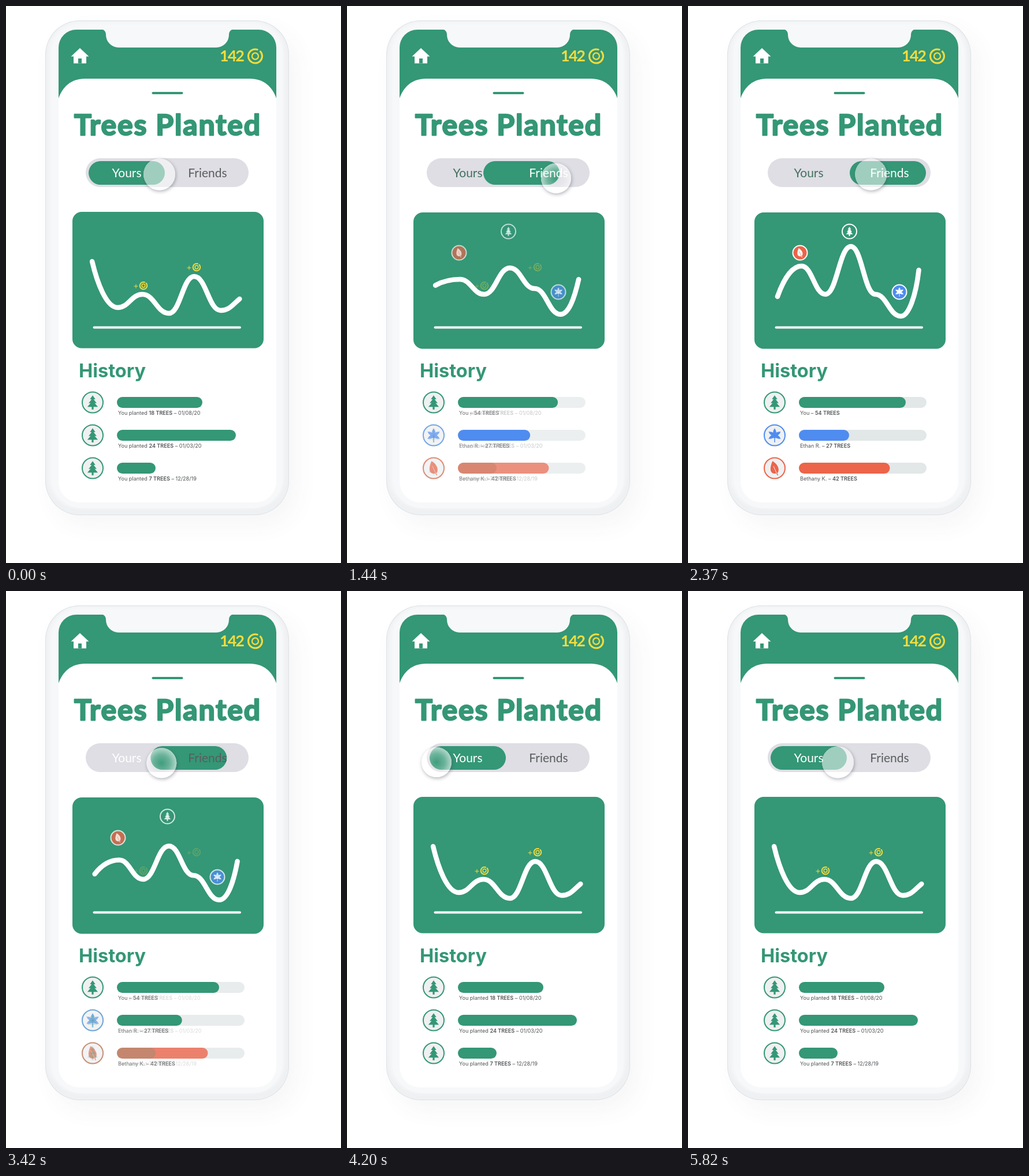
Animation, 580 px wide and 966 px high, one loop 6750 ms. Source, as an HTML page with a canvas:

```html
<!DOCTYPE html>
<html lang="en">
<head>
<meta charset="utf-8">
<title>Trees Planted</title>
<style>
  html, body { margin: 0; width: 100%; height: 100%; overflow: hidden; background: #fff; }
  canvas { display: block; width: 580px; height: 966px; }
</style>
</head>
<body>
<canvas id="stage" width="580" height="966"></canvas>
<script>
const ctx = document.getElementById('stage').getContext('2d');
const LOOP = 6750, STEP = 30, LAST_MOVE = 5820;
const GREEN = '#349776', BLUE = '#4f8cf0', RED = '#ec6449', GOLD = '#f5dc3c', BEZEL = '#f7f8f9';

// The drag to "Friends", the drag back, and the knob's free glides between them.
const DRAG = 965, GLIDE = 625, OUT = 840, BACK = 3130;
const PILL_TRAVEL = 137, KNOB_GLIDE = 114, OVERSHOOT = 7;

// Turning points of the chart: x, then y for each tab.
const CURVE = [[152, 443, 504], [195, 523, 451], [237, 500, 500], [282, 533, 417],
  [325, 469, 500], [370, 528, 538], [402, 508, 458]];

const ROWS = [
  { icon: 'tree', color: GREEN, from: 148, to: 185, count: 18, date: '01/08/20', who: 'You', total: 54 },
  { icon: 'maple', color: BLUE, from: 206, to: 87, count: 24, date: '01/03/20', who: 'Ethan R.', total: 27 },
  { icon: 'leaf', color: RED, from: 67, to: 157.5, count: 7, date: '12/28/19', who: 'Bethany K.', total: 42 }
];

const lerp = (a, b, k) => a + (b - a) * k;

function ramp(t, start, duration) {
  const k = Math.min(1, Math.max(0, (t - start) / duration));
  return k * k * (3 - 2 * k);
}

function pose(t) {
  const shift = ramp(t, OUT, DRAG) - ramp(t, BACK, DRAG);
  const over = ramp(t, OUT + DRAG, 95) - ramp(t, BACK + DRAG, 95);
  const glide = ramp(t, 1901, GLIDE) - ramp(t, 5306, GLIDE) + 1 - ramp(t, -560, GLIDE);
  const low = ramp(t, 800, 400) - ramp(t, 1901, 500) + ramp(t, 2980, 300);
  return {
    shift,
    returning: t >= BACK,
    active: ramp(t, OUT, 120) - ramp(t, BACK, 120),
    press: ramp(t, 700, 150) - ramp(t, 1850, 150) + ramp(t, 2980, 150) - ramp(t, 4200, 200),
    x: 269 + PILL_TRAVEL * shift + OVERSHOOT * over - KNOB_GLIDE * glide,
    y: 292 + 5 * low + 8 * shift * (1 - shift)
  };
}

function mix(a, b, k) {
  const part = (c, i) => parseInt(c.slice(i, i + 2), 16);
  return `rgb(${[1, 3, 5].map(i => Math.round(lerp(part(a, i), part(b, i), k)))})`;
}

function withAlpha(alpha, draw) {
  ctx.save();
  ctx.globalAlpha *= alpha;
  draw();
  ctx.restore();
}

// The incoming state always lies on top of the outgoing one.
function crossfade({ shift, returning }, yours, friends) {
  const layers = [() => withAlpha(1 - shift, yours), () => withAlpha(shift, friends)];
  if (returning) layers.reverse();
  layers.forEach(draw => draw());
}

function roundBox(x, y, w, h, r, fill) {
  ctx.beginPath();
  ctx.roundRect(x, y, w, h, r);
  if (fill) { ctx.fillStyle = fill; ctx.fill(); }
}

function disc(x, y, r, fill) {
  ctx.beginPath();
  ctx.arc(x, y, r, 0, Math.PI * 2);
  ctx.fillStyle = fill;
  ctx.fill();
}

function ring(x, y, r, width, color, start = 0, end = Math.PI * 2) {
  ctx.beginPath();
  ctx.arc(x, y, r, start, end);
  ctx.lineWidth = width;
  ctx.strokeStyle = color;
  ctx.stroke();
}

function line(x1, y1, x2, y2, width, color, cap = 'round') {
  ctx.beginPath();
  ctx.moveTo(x1, y1);
  ctx.lineTo(x2, y2);
  ctx.lineWidth = width;
  ctx.lineCap = cap;
  ctx.strokeStyle = color;
  ctx.stroke();
}

function triangle(x, top, halfWidth, height) {
  ctx.beginPath();
  ctx.moveTo(x, top);
  ctx.lineTo(x + halfWidth, top + height);
  ctx.lineTo(x - halfWidth, top + height);
  ctx.fill();
}

function text(str, x, y, font, color, align = 'left', spacing = 0) {
  ctx.font = font;
  ctx.textAlign = align;
  ctx.letterSpacing = spacing + 'px';
  ctx.fillStyle = color;
  ctx.fillText(str, x, y);
}

const SYMBOLS = {
  tree() {
    for (let tier = 0; tier < 3; tier++) triangle(0, -1 + tier * .38, .38 + tier * .18, .56 + tier * .16);
    ctx.fillRect(-.13, .5, .26, .5);
  },
  maple(color) {
    ctx.beginPath();
    for (let i = -10; i <= 10; i++) {
      const reach = i % 4 === 0 ? 1 : i % 2 ? .7 : .45;
      const angle = i * Math.PI / 12;
      ctx.lineTo(Math.sin(angle) * reach, -Math.cos(angle) * reach);
    }
    ctx.fill();
    line(0, 0, 0, 1, .12, color, 'butt');
  },
  leaf(color, back) {
    ctx.beginPath();
    ctx.moveTo(-.3, -1);
    ctx.bezierCurveTo(.3, -.65, .85, .1, .38, .72);
    ctx.bezierCurveTo(-.75, 1, -.75, 0, -.3, -1);
    ctx.fill();
    line(-.15, -.25, .27, .7, .08, back);
    line(.3, .72, .45, 1, .12, color, 'butt');
  }
};

function symbol(kind, x, y, size, color, back) {
  ctx.save();
  ctx.translate(x, y);
  ctx.scale(size, size);
  ctx.fillStyle = color;
  SYMBOLS[kind](color, back);
  ctx.restore();
}

function coin(x, y, r, width) {
  ctx.lineCap = 'round';
  ring(x, y, r, width, GOLD, -.75, Math.PI * 2 - 1.25);
  ring(x, y, r * .46, width * .75, GOLD);
}

function drawPhone() {
  const body = fill => roundBox(68, 25, 422, 858, 60, fill);
  ctx.save();
  ctx.shadowColor = 'rgba(70,85,100,.05)';
  ctx.shadowBlur = 40;
  ctx.shadowOffsetX = 14;
  ctx.shadowOffsetY = 18;
  body(BEZEL);
  ctx.restore();

  // Soft shading along the inside edge, stronger at the bottom right.
  ctx.save();
  body();
  ctx.clip();
  ctx.shadowColor = '#b3bdc7';
  ctx.shadowBlur = 13;
  ctx.shadowOffsetX = -1;
  ctx.shadowOffsetY = -5;
  ctx.lineWidth = 2;
  ctx.strokeStyle = '#dde2e7';
  body();
  ctx.stroke();
  ctx.restore();

  roundBox(79, 33, 400, 838, 52, BEZEL);
  roundBox(91, 41, 377, 820, 36, '#fff');
}

function drawHeader() {
  ctx.save();
  roundBox(91, 41, 377, 820, 31);
  ctx.clip();
  ctx.fillStyle = GREEN;
  ctx.fillRect(91, 41, 377, 120);
  ctx.fillStyle = '#fff';
  ctx.beginPath();
  ctx.moveTo(91, 162);
  ctx.lineTo(91, 160);
  ctx.bezierCurveTo(98, 140, 113, 126, 137, 126);
  ctx.lineTo(422, 126);
  ctx.bezierCurveTo(446, 126, 461, 140, 468, 160);
  ctx.lineTo(468, 162);
  ctx.fill();
  ctx.fillStyle = BEZEL;
  ctx.beginPath();
  ctx.moveTo(164, 40);
  ctx.quadraticCurveTo(173, 41, 173, 50);
  ctx.arcTo(173, 72, 196, 72, 22);
  ctx.arcTo(386, 72, 386, 50, 22);
  ctx.quadraticCurveTo(386, 41, 395, 40);
  ctx.fill();
  ctx.restore();

  ctx.fillStyle = '#fff';
  triangle(128, 73, 15.5, 14.5);
  ctx.fillRect(117, 85, 22, 14.5);
  ctx.fillStyle = GREEN;
  ctx.fillRect(125, 91, 6, 8.5);

  text('142', 370, 96, '700 27px Lato, sans-serif', GOLD, 'left', -2);
  coin(431.5, 87, 12, 3);
  line(254.5, 151, 304.5, 151, 4, GREEN);

  text('Trees Planted', 280, 224, '700 50px Lato, sans-serif', GREEN, 'center', 1.8);
  ctx.lineWidth = 2.4;
  ctx.lineJoin = 'round';
  ctx.strokeStyle = GREEN;
  ctx.strokeText('Trees Planted', 280, 224);
}

function drawToggle({ shift, active }) {
  const font = '400 21px Lato, sans-serif';
  roundBox(138, 264, 282, 50, 25, '#dedee4');
  roundBox(143 + PILL_TRAVEL * shift, 269, 132, 41, 20.5, GREEN);
  text('Yours', 209, 297, font, mix('#ffffff', '#45705f', active), 'center');
  text('Friends', 349, 297, font, mix('#5a5d5e', '#ffffff', active), 'center');
}

function drawCurve(k) {
  // The ends draw in a little as the wave grows.
  const pts = CURVE.map(([x, a, b], i) => [x + (3 - i) * 1.6 * (k - .5) + (i === 0 ? -1 : 0) * (.5 - k), lerp(a, b, k)]);
  const end = pts.length - 1;
  ctx.beginPath();
  ctx.moveTo(...pts[0]);
  for (let i = 1; i <= end; i++) {
    const [x0, y0] = pts[i - 1], [x1, y1] = pts[i], reach = (x1 - x0) * .45;
    const a = i === 1 ? [x0 + 8.5, lerp(y0, y1, .45)] : [x0 + reach, y0];
    const b = i === end ? [x1 - lerp(13, 5, k), lerp(y1, y0, .55)] : [x1 - reach, y1];
    ctx.bezierCurveTo(...a, ...b, x1, y1);
  }
  ctx.lineWidth = 8.5;
  ctx.lineCap = ctx.lineJoin = 'round';
  ctx.strokeStyle = '#fff';
  ctx.stroke();
}

function badge(kind, x, y, color) {
  disc(x, y, 12, color);
  ring(x, y, 12.5, 2, '#fff');
  symbol(kind, x, y, 8, '#fff', color);
}

function reward(x, y) {
  coin(x, y, 6.3, 2);
  line(x - 16.5, y + 1, x - 9.5, y + 1, 1, GOLD, 'butt');
  line(x - 13, y - 2.5, x - 13, y + 4.5, 1, GOLD, 'butt');
}

function drawChart(state) {
  roundBox(115, 357 + Math.round(state.shift), 331, 236.5, 16, GREEN);
  line(152.5, 557.5, 405, 557.5, 4, '#fff');
  drawCurve(state.shift);
  crossfade(state, () => {
    reward(238, 485);
    reward(330, 453);
  }, () => {
    badge('tree', 279.5, 391, GREEN);
    badge('leaf', 194, 428, RED);
    badge('maple', 366, 496, BLUE);
  });
}

function rowIcon(kind, y, color) {
  disc(150, y, 18, '#eff0f1');
  ring(150, y, 18, 2, color);
  symbol(kind, 150, y, 12.3, color, '#eff0f1');
}

function caption(y, ...parts) {
  let x = 194;
  parts.forEach((part, i) => {
    text(part, x, y + 21.7, `${i === 1 ? 600 : 400} 9.1px Inter, sans-serif`, '#505355');
    x += ctx.measureText(part).width;
  });
}

function bar(y, width, color) {
  roundBox(192, y - 9.5, width, 19, 9.5, color);
}

function drawHistory(state) {
  const { shift, active } = state;
  text('History', 126, 643.5, '700 32.5px Inter, sans-serif', GREEN);
  ROWS.forEach(({ icon, color, from, to, count, date, who, total }, i) => {
    const y = 687.5 + 57 * i;
    if (icon === 'tree') rowIcon(icon, y, color);
    else crossfade(state, () => rowIcon('tree', y, GREEN), () => rowIcon(icon, y, color));

    withAlpha(shift, () => bar(y, 221, '#e2e7e8'));
    if (icon === 'leaf') crossfade(state, () => bar(y, from, GREEN), () => bar(y, to, color));
    else bar(y, lerp(from, to, shift), mix(GREEN, color, active));

    crossfade(state,
      () => caption(y, 'You planted ', `${count} TREES`, ` – ${date}`),
      () => caption(y, `${who} – `, `${total} TREES`));
  });
}

function drawKnob({ x, y, press }) {
  const r = lerp(27.5, 26, press);
  // The shadow is kept outside the see-through disc.
  ctx.save();
  ctx.beginPath();
  ctx.rect(x - 60, y - 60, 120, 120);
  ctx.arc(x, y, r, 0, Math.PI * 2);
  ctx.clip('evenodd');
  ctx.shadowColor = 'rgba(60,65,80,.42)';
  ctx.shadowBlur = 6;
  ctx.shadowOffsetX = 1;
  ctx.shadowOffsetY = 2;
  disc(x, y, r, '#fff');
  ctx.restore();

  const glow = ctx.createRadialGradient(x, y, 0, x, y, r);
  const stop = (at, alpha) => glow.addColorStop(at, `rgba(255,255,255,${lerp(.53, alpha, press)})`);
  stop(0, .06);
  stop(.55, .27);
  stop(1, .62);
  disc(x, y, r, glow);
}

function render(now) {
  const state = pose(Math.min(Math.floor((now % LOOP) / STEP) * STEP, LAST_MOVE));
  ctx.fillStyle = '#fff';
  ctx.fillRect(0, 0, 580, 966);
  drawPhone();
  drawHeader();
  drawToggle(state);
  drawChart(state);
  drawHistory(state);
  drawKnob(state);
}

const started = performance.now();
function tick() {
  render(performance.now() - started);
  requestAnimationFrame(tick);
}
tick();
</script>
</body>
</html>
```
